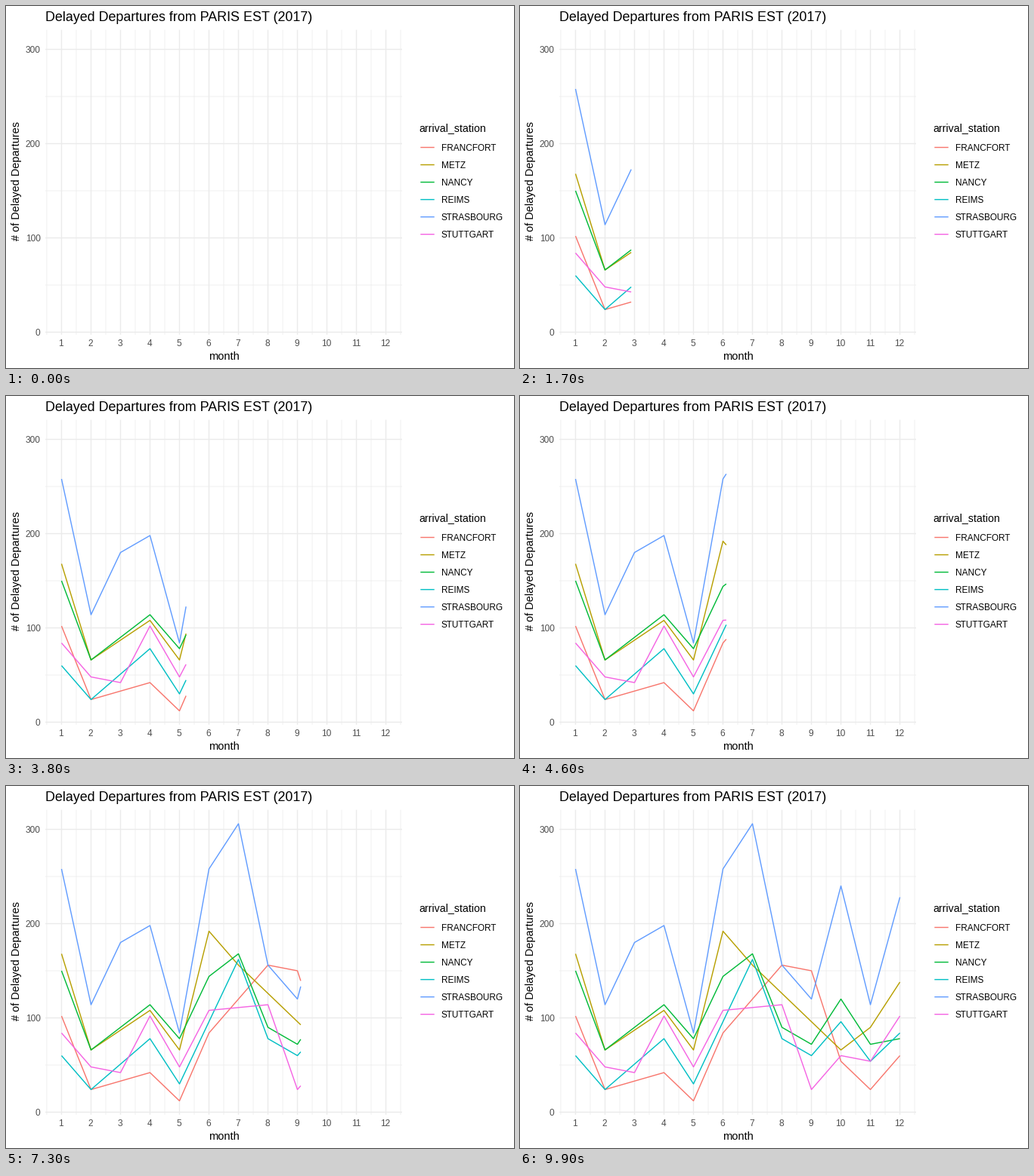
A matplotlib script for the animation above (10000 ms loop, 672 by 480 pixels).

```python
import matplotlib.pyplot as plt
import numpy as np
from matplotlib.animation import FuncAnimation

plt.rcParams["font.family"] = "Liberation Sans"

W, H, DPI = 672, 480, 96
FRAMES, INTERVAL = 100, 100
LEFT, RIGHT, TOP, BOTTOM = 52.0, 524.0, 31.6, 435.9
LINE = 1.42 * 72 / DPI
GRID, TICK = "#EBEBEB", "#4D4D4D"

MONTHS = np.arange(1, 13)
COUNTS = range(0, 301, 100)

# Key points per month; a gap lies on the straight run between its neighbours.
_ = np.nan
STATIONS = {
    "FRANCFORT": ("#F8766D", [102, 24, _, 42, 12, 84, _, 156, 150, 54, 24, 60]),
    "METZ": ("#B79F00", [168, 66, _, 108, 66, 192, 156, _, _, 66, 90, 138]),
    "NANCY": ("#00BA38", [150, 66, _, 114, 78, 144, 168, 90, 72, 120, 72, 78]),
    "REIMS": ("#00BFC4", [60, 24, _, 78, 30, _, 162, 78, 60, 96, 54, 84]),
    "STRASBOURG": ("#619CFF", [258, 114, 180, 198, 84, 258, 306, 156, 120, 240, 114, 228]),
    "STUTTGART": ("#F564E3", [84, 48, 42, 102, 48, 108, _, 114, 24, 60, 54, 102]),
}


def to_x(month):
    return LEFT + (np.asarray(month) - 0.45) * (RIGHT - LEFT) / 12.1


def to_y(count):
    return 432.5 - np.asarray(count) * 1.25


def fill_gaps(points):
    points = np.array(points, float)
    known = ~np.isnan(points)
    return np.interp(MONTHS, MONTHS[known], points[known])


fig = plt.figure(figsize=(W / DPI, H / DPI), dpi=DPI, facecolor="white")
ax = fig.add_axes([0, 0, 1, 1])
ax.set_xlim(0, W)
ax.set_ylim(H, 0)
ax.axis("off")


def stroke(xs, ys, color, width=LINE, z=3):
    line, = ax.plot(xs, ys, color=color, lw=width, zorder=z, snap=False,
                    solid_capstyle="butt", solid_joinstyle="round")
    return line


def label(x, y, text, size, color="black", ha="left", angle=0):
    ax.text(x, y, text, fontsize=size, color=color, ha=ha, va="baseline",
            rotation=angle, rotation_mode="anchor")


def grid(months, counts, width, z):
    for y in to_y(counts):
        stroke([LEFT, RIGHT], [y, y], GRID, width, z)
    for x in to_x(months):
        stroke([x, x], [TOP, BOTTOM], GRID, width, z)


grid(np.arange(0.5, 13), np.arange(50, 300, 100), LINE / 2, 1)
grid(MONTHS, COUNTS, LINE, 2)

label(52, 20, "Delayed Departures from PARIS EST (2017)", 13.4)
label((LEFT + RIGHT) / 2, 469, "month", 11, ha="center")
label(18, (TOP + BOTTOM) / 2 - 1.5, "# of Delayed Departures", 10.85,
      ha="center", angle=90)
for m in MONTHS:
    label(to_x(m) - 0.7, 451, str(m), 8.9, TICK, "center")
for c in COUNTS:
    label(45.5, to_y(c) + 4.3, str(c), 8.9, TICK, "right")

label(546, 166.5, "arrival_station", 10.6)
curves = []
for i, (name, (color, points)) in enumerate(STATIONS.items()):
    y = 187.5 + 23.04 * i
    stroke([548.3, 566.7], [y, y], color)
    label(576, y + 4.4, name, 8.8)
    curves.append((stroke([], [], color, z=4 + i), fill_gaps(points)))


def update(frame):
    now = 1 + 11 * frame / (FRAMES - 1)
    months = np.append(MONTHS[MONTHS < now], now)
    for line, counts in curves:
        line.set_data(to_x(months), to_y(np.interp(months, MONTHS, counts)))
    return [line for line, _counts in curves]


anim = FuncAnimation(fig, update, frames=FRAMES, interval=INTERVAL,
                     repeat=True, repeat_delay=0, blit=False)
plt.show()
```
